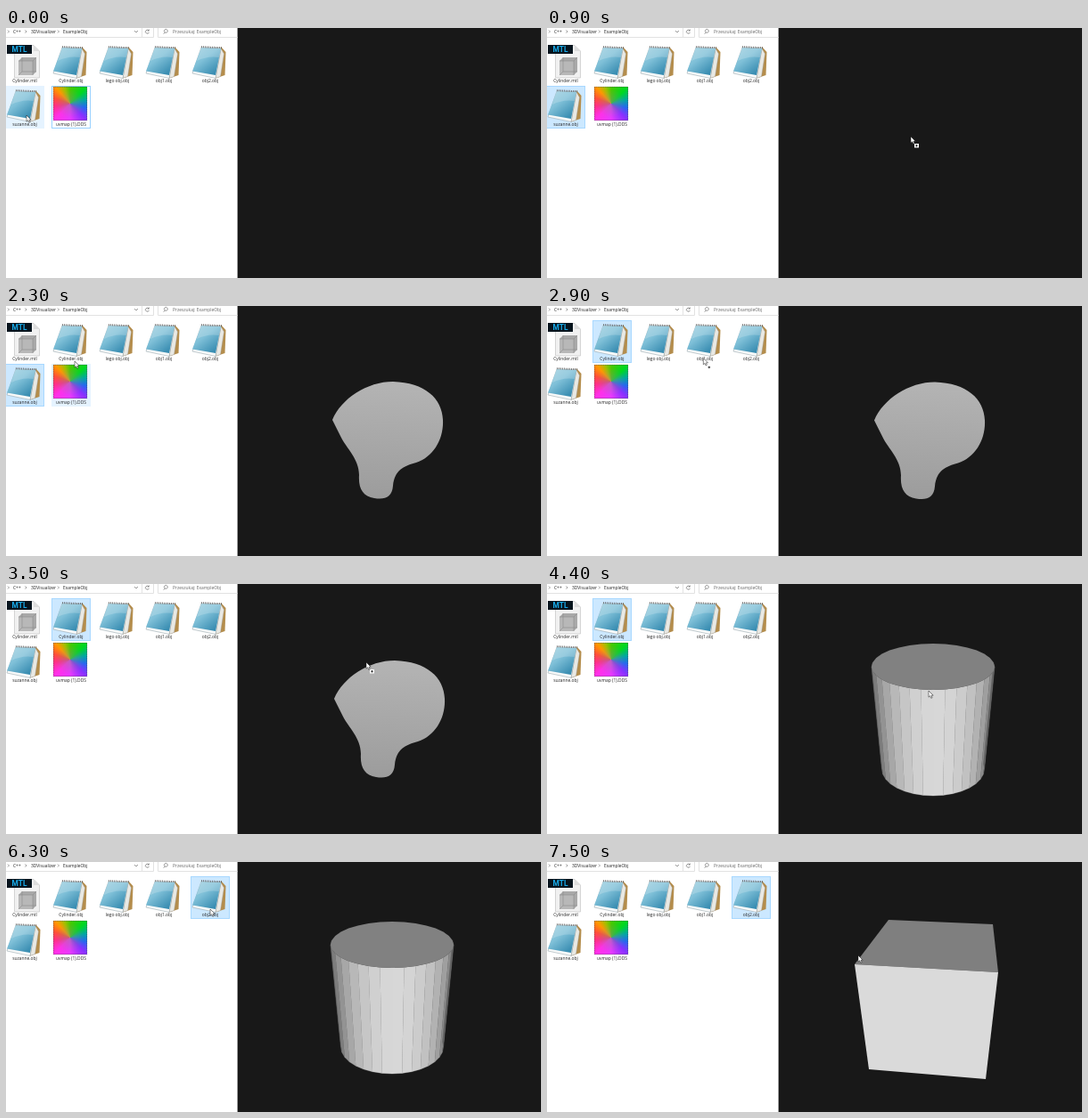
Write an HTML page that moves like this. It is 600 by 281 pixels and loops after 7600 ms.

```html
<!DOCTYPE html>
<html lang="en">
<head>
<meta charset="utf-8">
<title>Model viewer demo</title>
<style>
  html, body { margin: 0; width: 100%; height: 100%; overflow: hidden; background: #181818; }
  svg { display: block; position: absolute; left: 0; top: 0; }
  text { font: 4.9px "Open Sans", "Noto Sans", sans-serif; fill: #222; }
  .mid { text-anchor: middle; }
  .hint { fill: #666; }
  .badge { font: 700 8.4px Roboto, "Open Sans", sans-serif; fill: #18a9e8; }
  .line { fill: none; stroke: #555; stroke-width: .6; }
  .frame { fill: none; stroke: #e2e2e2; }
  .uv {
    width: 38px; height: 38px;
    background:
      radial-gradient(circle, #8888 0, #8880 60%),
      conic-gradient(#48c800, #00d820 45deg, #00a8a0 75deg, #2468f0 105deg, #8a30ff 135deg,
        #e838ff 180deg, #ff30e8 225deg, #ff3088 260deg, #ff5038 290deg, #ff9800 318deg, #a0c000 340deg, #48c800);
  }
</style>
</head>
<body>
<svg width="600" height="281" viewBox="0 0 600 281">
  <defs>
    <linearGradient id="cover" x1="0" y1="0" x2=".8" y2="1">
      <stop offset="0" stop-color="#9fd0df"/>
      <stop offset=".45" stop-color="#7fc0d8"/>
      <stop offset="1" stop-color="#3187ad"/>
    </linearGradient>
    <linearGradient id="grey" x1=".5" y1="0" x2=".45" y2="1">
      <stop offset="0" stop-color="#b4b4b4"/>
      <stop offset="1" stop-color="#9c9c9c"/>
    </linearGradient>
    <g id="notepad">
      <path d="M33 3 38.500 9 37.500 35 27 38.500Z" fill="#b48d4c"/>
      <path d="M33 5 36.500 11 32.500 36.500 27 38.500Z" fill="#e9e9e4" stroke="#999" stroke-width=".4"/>
      <path d="M11 4 33 5 27 38.500 1 33Z" fill="#f7f9f9" stroke="#8a9aa0" stroke-width=".5"/>
      <path d="M11 4 33 5 27 35 1 30.500Z" fill="url(#cover)"/>
      <path d="M11 4 33 5 31 15Q18 13 6 19Z" fill="#fff" opacity=".2"/>
      <path d="M11 3.200 34 4.200" stroke="#555" stroke-width="2" stroke-dasharray=".8 1.200"/>
    </g>
  </defs>

  <rect width="259.600" height="281" fill="#fff"/>
  <path class="frame" d="M0 10.500H165.500V0M152.500 0V10M170.500 0V10.500H259.500"/>
  <path class="line" d="M2 2.500 3.500 4 2 5.500M21.500 2.500 23 4 21.500 5.500M58 2.500 59.500 4 58 5.500M144 3 146 5 148 3"/>
  <path class="line" d="M160 2.900A2 2 0 1 0 160.400 4.800M160.300 1.500V3.100H158.700"/>
  <path class="line" d="M178.200 4.900 176.800 6.700M178.200 4.900A1.900 1.900 0 1 1 180.500 4.900 1.900 1.900 0 0 1 178.200 4.900"/>
  <text x="8" y="5.500">C++</text>
  <text x="28" y="5.500">3DVisualizer</text>
  <text x="64" y="5.500">ExampleObj</text>
  <text class="hint" x="187" y="5.500">Przeszukaj: ExampleObj</text>

  <g id="marks"></g>

  <path d="M9.500 19.500H31L37.500 26V56H9.500Z" fill="#f1f1f1" stroke="#c4c4c4" stroke-width=".7"/>
  <path d="M31 19.500V26H37.500Z" fill="#ddd"/>
  <path d="M14 37 18 33H34V49L30 53H14Z" fill="#a9a9a9"/>
  <path d="M14 37H30V53H14Z" fill="#b8b8b8"/>
  <path d="M14 37H30V53M30 37 34 33M18 33V49H34M14 53 18 49" fill="none" stroke="#8c8c8c" stroke-width=".6"/>
  <rect x="1" y="19" width="28" height="10" fill="#07141d"/>
  <text class="badge mid" x="15" y="27">MTL</text>
  <foreignObject x="53" y="66" width="38" height="38"><div class="uv"></div></foreignObject>
  <rect x="53.300" y="66.300" width="37.400" height="37.400" fill="none" stroke="#444" stroke-width=".6" stroke-dasharray="1 1"/>
  <g id="files"></g>

  <path id="head" fill="url(#grey)"
    d="M366 128C376 104 405 85 434 85C470 86 489 104 490 128C491 150 479 170 460 176C446 180 436 184 434 202C433 215 425 218 413 216C400 214 395 205 396 190C396 172 382 160 376 148Z"/>
  <g id="drum"></g>
  <g id="cube"><polygon id="lid" fill="#7f7f7f"/><polygon id="front" fill="#dadada"/></g>

  <g id="cursor">
    <path d="M0 0V7.200L1.700 5.700 2.800 8.300 4.100 7.700 3 5.200H5.200Z" fill="#fff" stroke="#111" stroke-width=".5"/>
    <g id="drag">
      <rect x="4" y="8" width="5" height="4.500" fill="#fff"/>
      <path d="M5.200 10.200H7.800M6.500 9V11.500" stroke="#222" stroke-width=".9"/>
    </g>
  </g>
</svg>

<script type="module">
const LOOP = 7600, STEP = 100;
const $ = id => document.getElementById(id);

function add(parent, tag, attrs, text) {
  const el = document.createElementNS('http://www.w3.org/2000/svg', tag);
  for (const k in attrs) el.setAttribute(k, attrs[k]);
  if (text) el.textContent = text;
  return parent.appendChild(el);
}

// Files: name, column, row
const files = [
  ['Cylinder.mtl', 0, 0], ['Cylinder.obj', 1, 0], ['lego obj.obj', 2, 0],
  ['obj1.obj', 3, 0], ['obj2.obj', 4, 0], ['suzanne.obj', 0, 1], ['uvmap (1).DDS', 1, 1]
];
for (const [name, col, row] of files) {
  const x = col * 52, y = row * 49;
  if (name.endsWith('.obj')) add($('files'), 'use', { href: '#notepad', x, y: y + 18 });
  add($('files'), 'text', { class: 'mid', x: x + 21, y: y + 61 }, name);
}

// Tile highlights: column, row, style, start, end
const styles = {
  hover: { fill: '#e5f3ff', stroke: '#e5f3ff' },
  pick: { fill: '#cce8ff', stroke: '#a8d8ff' },
  focus: { fill: '#fff', stroke: '#99d1ff' }
};
const marks = [
  [0, 1, 'hover', 0, 200], [1, 1, 'focus', 0, 200], [0, 1, 'pick', 200, 2600],
  [1, 1, 'hover', 2200, 2400], [1, 0, 'hover', 2400, 2600], [1, 0, 'pick', 2600, 6100],
  [4, 0, 'hover', 5900, 6100], [4, 0, 'pick', 6100, LOOP]
].map(([col, row, style, from, to]) => ({
  from, to,
  el: add($('marks'), 'rect', {
    x: col * 52 - .5, y: row * 49 + 16.5, width: 43, height: 47, ...styles[style]
  })
}));

// Cylinder: shaded facets below a flat lid
const SEGS = 32;
const ring = (a, rx, cy, ry) =>
  (433 + rx * Math.sin(a)).toFixed(1) + ',' + (cy + ry * Math.cos(a)).toFixed(1);
const upper = a => ring(a, 69, 93, 26);
const lower = a => ring(a, 57.5, 208, 30);
for (let i = -9; i < 9; i++) {
  const a = i * 2 * Math.PI / SEGS, b = a + 2 * Math.PI / SEGS;
  const v = Math.round(98 + 117 * Math.max(0, Math.cos((a + b) / 2 - .06)));
  const fill = `rgb(${v},${v},${v})`;
  add($('drum'), 'polygon', {
    points: [upper(a), upper(b), lower(b), lower(a)].join(' '), fill, stroke: fill, 'stroke-width': .3
  });
}
add($('drum'), 'polygon', {
  points: Array.from({ length: SEGS }, (_, i) => upper(i * 2 * Math.PI / SEGS)).join(' '),
  fill: '#818181'
});

// Cube corners at both ends of its small turn: back pair, front top pair, front bottom pair
const cubeA = [[380, 64], [499, 69], [505, 123], [342, 116], [359, 236], [492, 246]];
const cubeB = [[383, 65], [500, 70], [506, 124], [345, 115], [361, 233], [492, 244]];

// Pointer path: time, x, y
const path = [
  [0, 23, 98], [200, 23, 98], [500, 150, 112], [800, 400, 119], [900, 408, 122],
  [1100, 410, 122], [1700, 390, 130], [2300, 77, 62], [2500, 73, 45], [2700, 73, 45],
  [3300, 380, 86], [3500, 404, 88], [4000, 428, 118], [4400, 428, 120], [4900, 426, 122],
  [5700, 300, 70], [6300, 229, 53], [6500, 229, 50], [7000, 400, 110], [7200, 380, 112],
  [7500, 349, 105], [LOOP, 349, 105]
];
const drags = [[300, 1100], [2700, 4100], [6500, 7100]];

const mix = (a, b, p) => a + (b - a) * p;
const ramp = (t, a, b) => Math.min(1, Math.max(0, (t - a) / (b - a)));
const within = (t, a, b) => t >= a && t < b;
const show = (el, on) => { el.style.display = on ? '' : 'none'; };

function render(t) {
  for (const m of marks) show(m.el, within(t, m.from, m.to));

  const i = path.findIndex(k => k[0] > t);
  const [t0, x0, y0] = path[i - 1], [t1, x1, y1] = path[i];
  const p = ramp(t, t0, t1);
  $('cursor').setAttribute('transform', `translate(${mix(x0, x1, p)} ${mix(y0, y1, p)})`);
  show($('drag'), drags.some(([a, b]) => within(t, a, b)));

  show($('head'), within(t, 1100, 4100));
  const drift = ramp(t, 2300, 3500);
  $('head').setAttribute('transform', `translate(${2 * drift} ${drift})`);
  show($('drum'), within(t, 4100, 7100));
  show($('cube'), t >= 7100);

  const turn = ramp(t, 7200, 7500);
  const c = cubeA.map((v, n) => v.map((q, k) => mix(q, cubeB[n][k], turn)));
  $('lid').setAttribute('points', [c[0], c[1], c[2], c[3]].join(' '));
  $('front').setAttribute('points', [c[3], c[2], c[5], c[4]].join(' '));
}

const began = performance.now();
function tick() {
  const t = (performance.now() - began) % LOOP;
  render(Math.floor(t / STEP) * STEP);
  requestAnimationFrame(tick);
}
tick();
</script>
</body>
</html>
```
